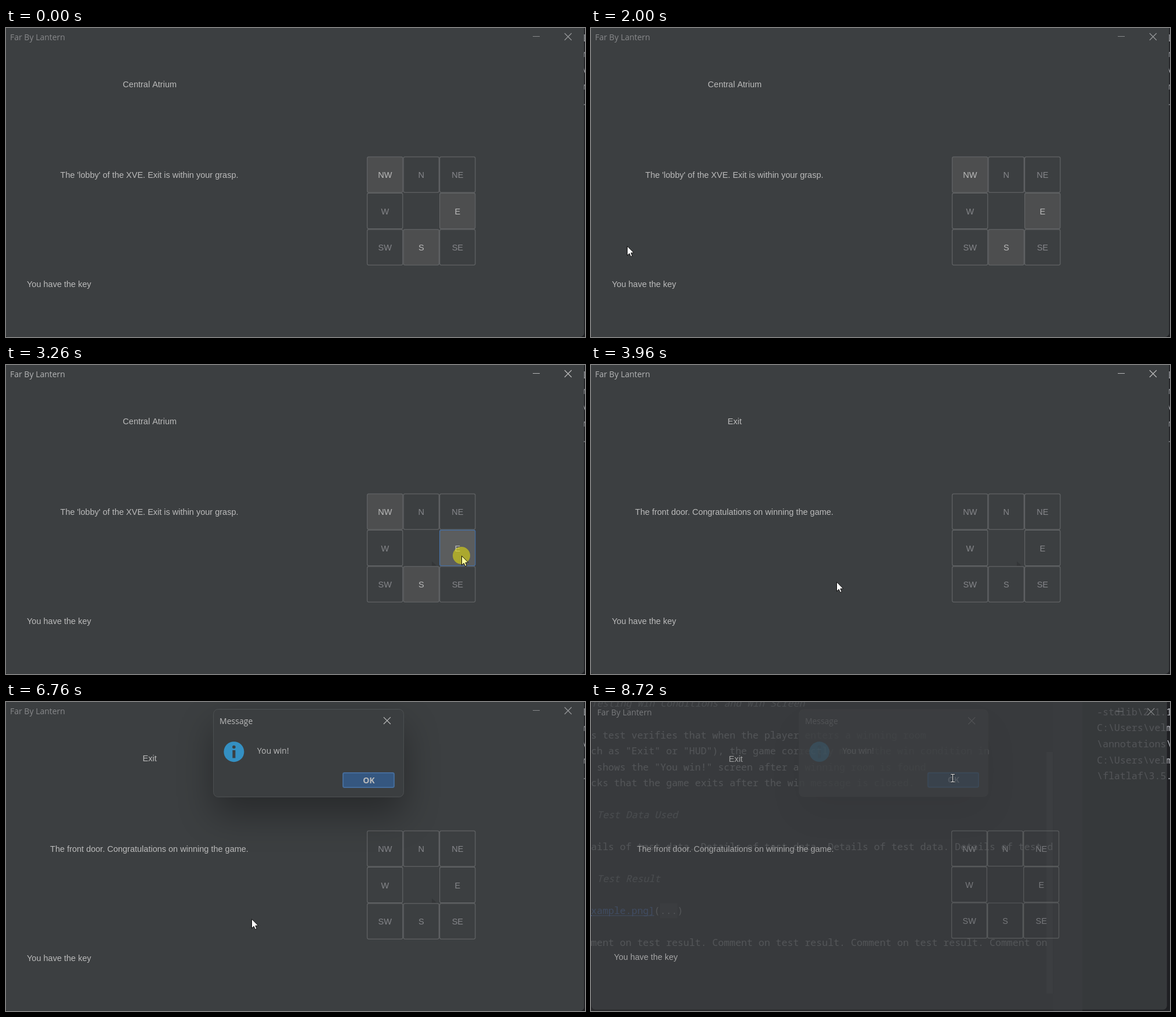
An HTML page with a canvas for the animation above (8.78 s loop, 998 by 532 pixels).

```html
<!DOCTYPE html>
<html lang="en">
<head>
<meta charset="utf-8">
<title>Room game</title>
<style>
html, body { margin: 0; width: 100%; height: 100%; overflow: hidden; background: #1e1f22; }
canvas { display: block; }
</style>
</head>
<body>
<canvas id="stage" width="998" height="532"></canvas>
<script>
const ctx = document.getElementById('stage').getContext('2d', { alpha: false });
const LOOP = 8780, STEP = 69;
const BG = '#3c3f41', TEXT = '#bbbbbb', DIM = '#85868a', LINE = '#616365';
const UI = '14.5px "Liberation Sans", Arial, sans-serif';
const TITLE = '14px "Open Sans", sans-serif';
const BOLD = 'bold 14px "Open Sans", sans-serif';
const MONO = '16.6px "Noto Sans Mono", monospace';

const mix = (a, b, u) => a + (b - a) * u;
const easeOut = u => 1 - (1 - u) ** 3;
const easeInOut = u => u * u * (3 - 2 * u);

const line = (a, b, ease) => u => a.map((v, d) => mix(v, b[d], ease(u)));

const bezier = (a, b, c, e) => u => a.map((v, d) =>
  v * (1 - u) ** 3 + 3 * b[d] * u * (1 - u) ** 2 + 3 * c[d] * u * u * (1 - u) + e[d] * u ** 3);

const arc = (cx, cy, rx, ry, from, to) => u => {
  const a = mix(from, to, u);
  return [cx + rx * Math.cos(a), cy + ry * Math.sin(a)];
};

// Pointer trips; between them the pointer rests
const trips = [
  { start: 190, end: 1020, path: line([728, 520], [72, 396], easeInOut) },
  { start: 1090, end: 1930, path: arc(118, 414, 94, 65, 3.3, -2) },
  { start: 2000, end: 2810, path: bezier([62, 375], [-100, 548], [200, 548], [722, 352]) },
  { start: 2880, end: 3080, path: line([733, 336], [785, 328], easeOut) },
  { start: 3620, end: 3960, path: line([775, 332], [423, 373], easeOut) },
  { start: 7290, end: 7910, path: bezier([423, 373], [563, 127], [624, 127], [624, 130]) }
];

function pointer(t) {
  const trip = trips.filter(p => t >= p.start).pop();
  if (!trip) return null;
  const span = trip.end - trip.start;
  const last = Math.round(span / STEP);
  const step = Math.min(last, Math.floor((t - trip.start) / span * last + 0.15));
  return trip.path(step / last).map(Math.round);
}

function text(str, x, y, color = TEXT, font = UI, align = 'left') {
  ctx.font = font;
  ctx.textAlign = align;
  ctx.fillStyle = color;
  ctx.fillText(str, x, y);
}

function rect(x, y, w, h, color) {
  ctx.fillStyle = color;
  ctx.fillRect(x, y, w, h);
}

function box(x, y, w, h, r, fill, stroke, width = 1) {
  ctx.beginPath();
  ctx.roundRect(x, y, w, h, r);
  if (fill) { ctx.fillStyle = fill; ctx.fill(); }
  if (stroke) { ctx.strokeStyle = stroke; ctx.lineWidth = width; ctx.stroke(); }
}

function disc(x, y, r, color) {
  ctx.beginPath();
  ctx.arc(x, y, r, 0, Math.PI * 2);
  ctx.fillStyle = color;
  ctx.fill();
}

function cross(x, y, color) {
  ctx.beginPath();
  for (const s of [-1, 1]) {
    ctx.moveTo(x - 6, y - 6 * s);
    ctx.lineTo(x + 6, y + 6 * s);
  }
  ctx.strokeStyle = color;
  ctx.lineWidth = 1.2;
  ctx.stroke();
}

function zoom(cx, cy, k) {
  ctx.translate(cx, cy);
  ctx.scale(k, k);
  ctx.translate(-cx, -cy);
}

// Editor and console behind the game
function drawEditor() {
  const ink = '#bcbec4', soft = '#8a8e95', italic = 'italic ' + MONO;
  const row = n => 7.8 + n * 27.5;
  const put = (n, str, x = 0, color = ink, font = MONO) => text(str, x, row(n), color, font);

  rect(0, 0, 998, 532, '#1e1f22');
  rect(0, 0, 797, 532, '#28282b');
  rect(797, 0, 50, 532, '#2b2d30');
  rect(785, 86, 11, 416, '#3d3f42');

  put(0, 'Testing Win Conditions and Win Screen', 0, soft, italic);
  put(2, 's test verifies that when the player enters a winning room');
  put(3, 'ch as "Exit" or "HUD"), the game correctly meets the win condition in');
  put(4, ' shows the "You win!" screen after a winning room is found');
  put(5, 'cks that the game exits after the win message is closed.');
  put(7, 'Test Data Used', 10, soft, italic);
  put(9, 'ails of' + ' test data. Details of'.repeat(3) + ' test d');
  put(11, 'Test Result', 10, soft, italic);
  rect(119, row(13) - 19, 30, 26, '#35373b');
  put(13, 'xample.png]', 0, '#548af7');
  rect(0, row(13) + 2, 109, 1, '#548af7');
  put(13, '(...)', 109);
  put(15, 'ment on' + ' test result. Comment on'.repeat(3));

  ['-stdlib\\2.1.1', 'C:\\Users\\velm', '\\annotations\\', 'C:\\Users\\velm', '\\flatlaf\\3.5.']
    .forEach((str, i) => text(str, 872, 22.5 + i * 27.7, ink, MONO));
}

function drawPad(t, won) {
  const names = ['NW', 'N', 'NE', 'W', '', 'E', 'SW', 'S', 'SE'];
  const hovered = t >= 2950 ? 'E' : t >= 2810 && t < 2880 ? 'S' : null;
  names.forEach((name, i) => {
    if (!name) return;
    const x = 622 + i % 3 * 62.5, y = 221.2 + Math.floor(i / 3) * 62.5;
    const open = !won && ['NW', 'E', 'S'].includes(name);
    const hover = open && name === hovered;
    const pressed = hover && t >= 3260;
    const fill = pressed ? '#5b5d5e' : hover ? '#555758' : open ? '#4d4e4f' : null;
    box(x + 0.6, y + 0.6, 61.2, 61.2, 2.5, fill, pressed ? '#466fa3' : LINE, 1.25);
    text(name, x + 31.3, y + 37, open ? TEXT : DIM, UI, 'center');
  });
  // Smudge left by the pointer in the empty middle cell
  if (t >= 2950 && t < 8720) {
    ctx.beginPath();
    ctx.moveTo(734, 338); ctx.lineTo(742, 345.5); ctx.lineTo(734, 345.5);
    ctx.fillStyle = '#343638';
    ctx.fill();
  }
}

function drawGame(t) {
  const won = t >= 3290;
  const active = t >= 3260 && t < 6550;
  const bar = active ? '#b4b5b6' : '#88898b';
  box(-3, -10, 999.5, 542, 7, BG);
  text('Far By Lantern', 7, 21, bar, TITLE);
  rect(908, 14, 12, 1, bar);
  cross(968.8, 15, active ? '#bbbbbb' : '#97989a');
  text(won ? 'Exit' : 'Central Atrium', 247.7, 102, TEXT, UI, 'center');
  text(won ? 'The front door. Congratulations on winning the game.'
           : "The 'lobby' of the XVE. Exit is within your grasp.", 247, 258, TEXT, UI, 'center');
  text('You have the key', 36, 446);
  drawPad(t, won);
}

function drawDialog(plate, content, k) {
  ctx.save();
  zoom(521.5, 88, k);
  ctx.globalAlpha = plate;
  ctx.save();
  ctx.shadowColor = `rgba(0,0,0,${0.34 * content})`;
  ctx.shadowBlur = 62;
  ctx.shadowOffsetY = 30;
  box(357.5, 12.5, 328, 151, 8, BG);
  ctx.restore();
  ctx.globalAlpha = content;
  box(357.5, 12.5, 328, 151, 8, null, '#4e5153');
  text('Message', 368, 38, TEXT, TITLE);
  cross(657, 32, TEXT);
  disc(392.8, 85.7, 17.5, '#3592c4');
  disc(392.8, 77.5, 2.8, BG);
  rect(390.3, 83, 5, 13.5, BG);
  text('You win!', 433, 89, TEXT, TITLE);
  box(581, 122, 88, 25, 2.5, '#365880', '#466d9c', 2);
  text('OK', 625.5, 139.7, TEXT, BOLD, 'center');
  ctx.restore();
}

function drawArrow([x, y], fill) {
  ctx.save();
  ctx.translate(x, y);
  ctx.beginPath();
  [[0.5, 0.7], [0.5, 16.6], [4.2, 13.2], [6.6, 18.6], [9.2, 17.5], [6.9, 12.2], [11.7, 11.9]]
    .forEach(p => ctx.lineTo(...p));
  ctx.closePath();
  ctx.fillStyle = fill;
  ctx.fill();
  ctx.strokeStyle = '#0c0c0c';
  ctx.lineWidth = 1;
  ctx.stroke();
  ctx.restore();
}

function drawBeam(x, y) {
  for (const [grow, color] of [[1, '#222426'], [0, '#e4e4e4']]) {
    const bar = (dy, w, h) => rect(x - (w + grow) / 2, y + dy - grow / 2, w + grow, h + grow, color);
    bar(-7, 1, 14);
    bar(-7, 7, 1);
    bar(6, 7, 1);
  }
}

function draw(t) {
  const closing = t >= 8720;
  drawEditor();
  ctx.save();
  if (closing) {
    zoom(498, 240, 0.9925);
    ctx.globalAlpha = 0.82;
  }
  drawGame(t);
  ctx.restore();

  if (closing) drawDialog(0.8, 0.18, 0.994);
  else if (t >= 8640) drawDialog(0.9, 0.65, 0.998);
  else if (t >= 6550) {
    const shown = easeOut(Math.min(1, Math.floor((t - 6480) / 70) / 5));
    drawDialog(shown, shown, mix(0.9, 1, shown));
  }

  const pos = pointer(t);
  if (closing) drawBeam(623.5, 131);
  else if (pos) {
    const click = (t >= 3260 && t < 3290) || (t >= 8570 && t < 8640);
    if (click) disc(...pos, 15, 'rgba(221,215,18,0.62)');
    drawArrow(pos, click ? '#ffff9c' : '#ffffff');
  }
}

function tick() {
  draw(performance.now() % LOOP);
  requestAnimationFrame(tick);
}
tick();
</script>
</body>
</html>
```
